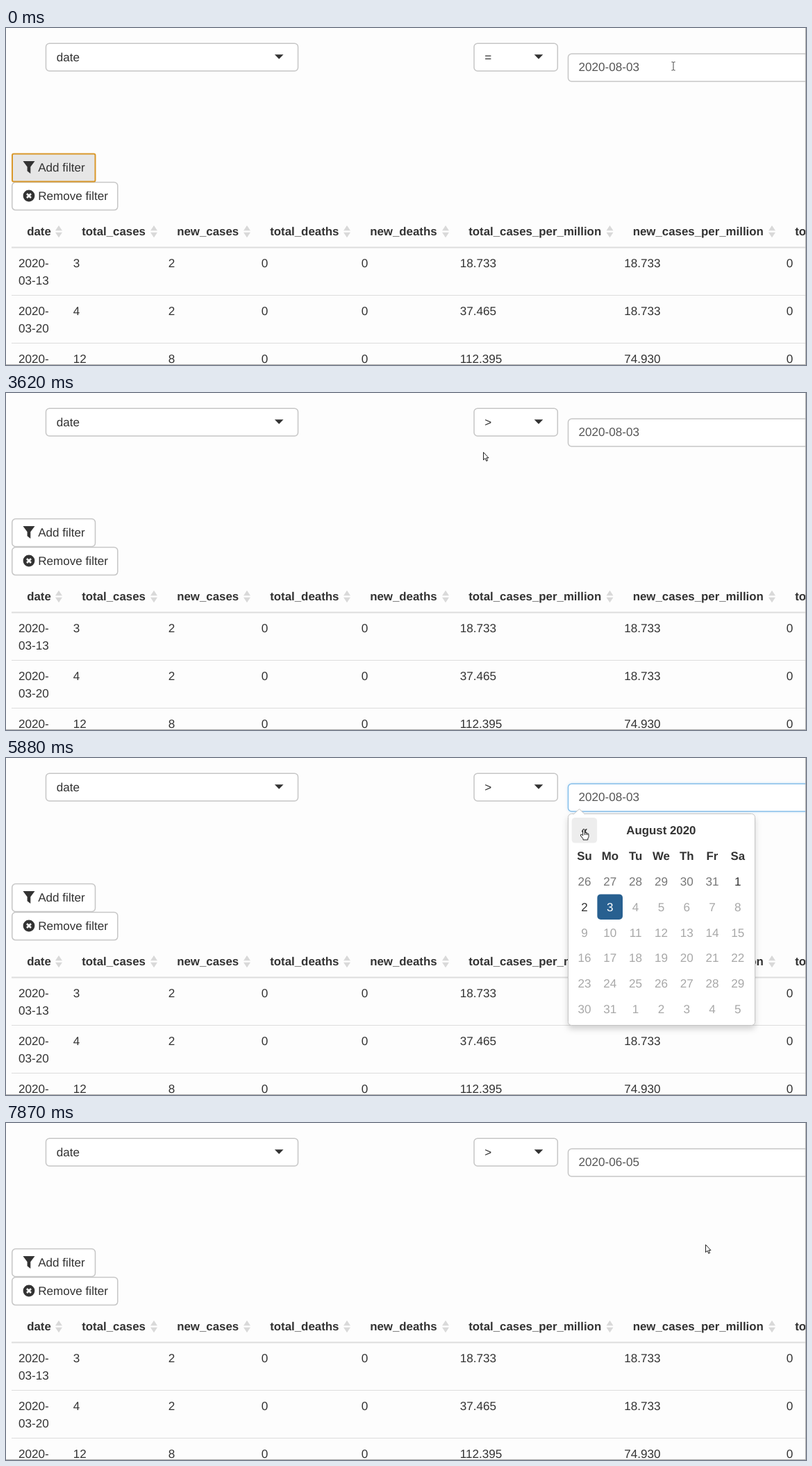
Recreate the animation shown at these times as an HTML page. Size 1152x486 px, loop 7.99 s.

```html
<!DOCTYPE html>
<html lang="en">
<head>
<meta charset="utf-8">
<title>Table filter</title>
<style>
  html, body { margin: 0; width: 100%; height: 100%; overflow: hidden; background: #fdfdfd; }
  svg { display: block; width: 1152px; height: 486px; }
  text { font: 17.1px "Liberation Sans", Arial, sans-serif; fill: #333; text-rendering: geometricPrecision; white-space: pre; }
  .bold { font-weight: 700; font-size: 16.85px; }
  .mid { text-anchor: middle; }
  .value { fill: #555; }
  .other { fill: #777; }
  .off { fill: #a8a8a8; }
  .active { fill: #fff; }
  .box { fill: #fff; stroke: #c6c6c6; stroke-width: 1.5; }
  .focus { stroke: #5aa9e6; filter: drop-shadow(0 0 3px rgba(102, 175, 233, .55)); }
  .fading { stroke: #86bfea; filter: drop-shadow(0 0 2px rgba(102, 175, 233, .3)); }
  .hover { fill: #e6e6e6; stroke: #adadad; }
  .ring { fill: #e6e6e6; stroke: #d9982b; stroke-width: 2; }
  .panel { fill: #fff; stroke: #c4c4c4; filter: drop-shadow(0 5px 4px rgba(0, 0, 0, .17)); }
  .option { fill: #f3f3f3; }
  .tile { fill: #ededed; }
  .picked { fill: #286090; }
  .ink { fill: #333; }
  .sort { fill: #d9d9d9; }
  .rule { fill: #ddd; }
  .edge { fill: #a9a9a9; }
  .pointer { fill: #fff; stroke: #222; stroke-linejoin: round; }
  .beam { fill: none; stroke: #444; }
</style>
</head>
<body>
<svg viewBox="0 0 1152 486"><g id="table"></g><g id="live"></g></svg>
<script>
const LOOP = 7990, TICK = LOOP / 60;
const WHEN = { open: 560, choose: 2380, focus: 5200, calendar: 5330, july: 6000, june: 6520, pick: 7610, close: 7740 };

const START = { x: 961, y: 55 };
const MOVES = [
  { from: 0, to: 700, x: 731, y: 33 },        // operator select
  { from: 900, to: 1990, x: 696, y: 185 },    // ">" option
  { from: 2250, to: 2780, x: 935, y: 68 },    // date input
  { from: 3350, to: 3590, x: 687, y: 85 },
  { from: 3600, to: 4140, x: 92, y: 210 },    // add button
  { from: 4140, to: 5060, x: 989, y: 55 },    // date input
  { from: 5330, to: 5730, x: 832, y: 102 },   // previous month
  { from: 6520, to: 7050, x: 992, y: 200 },
  { from: 7060, to: 7480, x: 1007, y: 175 }   // day to pick
];

const OPTIONS = ["=", "not =", "<", ">", "<=", ">="];
const ROW = 31.6, CELL = 36.8, CAL_X = 814.6, CAL_Y = 86;
const LAST_DAY = Date.UTC(2020, 7, 3);

const escapeText = s => String(s).replace(/&/g, "&amp;").replace(/</g, "&lt;");
const text = (x, y, s, cls = "") => `<text x="${x}" y="${y}" class="${cls}">${escapeText(s)}</text>`;
const rect = (x, y, w, h, cls, r = 0) => `<rect x="${x}" y="${y}" width="${w}" height="${h}" rx="${r}" class="${cls}"/>`;
const path = (d, cls, x = 0, y = 0) => `<path d="${d}" class="${cls}" transform="translate(${x} ${y})"/>`;
const inside = ({ x, y }, left, top, right, bottom) => x >= left && x < right && y >= top && y < bottom;

function table() {
  const names = ["date", "total_cases", "new_cases", "total_deaths", "new_deaths",
    "total_cases_per_million", "new_cases_per_million", "total_deaths_per_million"];
  const edges = [8, 87, 224, 358, 502, 644, 880.5, 1114];
  const rows = [
    ["03-13", 3, 2, 0, 0, "18.733", "18.733", 0],
    ["03-20", 4, 2, 0, 0, "37.465", "18.733", 0],
    ["", 12, 8, 0, 0, "112.395", "74.930", 0]
  ];
  const head = names.map((name, i) => text(edges[i] + 22.2, 299.2, name, "bold") +
    (i ? path("M-5 -1.2L0 -8.7L5 -1.2ZM-5 1.2L0 8.7L5 1.2Z", "sort", edges[i] - 11, 293.5) : "")).join("");
  const body = rows.map(([day, ...cells], i) => {
    const y = 345.2 + i * 68.8;
    return text(18, y, "2020-") + text(18, y + 24.5, day) + rect(8, 385 + i * 69, 1144, 1, "rule") +
      cells.map((cell, c) => text(edges[c + 1] + 9.8, y, cell)).join("");
  }).join("");
  return head + rect(8, 315.5, 1144, 2, "rule") + body;
}

function select(x, w, value, open) {
  const arrow = open ? "M-6.3 3L0 -3.5L6.3 3Z" : "M-6.3 -3L6.3 -3L0 3.5Z";
  return rect(x, 22.3, w, 39.7, "box" + (open ? " focus" : ""), 5) +
    text(x + 15.2, 47.5, value) + path(arrow, "ink", x + w - 27.3, 41.3);
}

function buttons(focused, hovered) {
  const add = focused ? rect(9, 181.5, 119.5, 40, "ring", 2)
    : rect(8.8, 181.5, 119.7, 40, "box" + (hovered ? " hover" : ""), 5);
  return rect(8.8, 222.6, 152, 40, "box", 5) + add +
    path("M24.5 192H41.5L35.3 200.3V210L30.6 206.3V200.3Z", "ink") +
    text(46.2, 207.3, "Add filter") +
    `<circle cx="33" cy="242" r="8.4" class="ink"/>` +
    `<path d="M30 239l6 6m0-6l-6 6" stroke="#fff" stroke-width="2.6"/>` +
    text(46.2, 248.3, "Remove filter");
}

function dropdown(active) {
  return rect(674.2, 66.5, 119.6, 201.5, "panel", 5) +
    rect(675, 72 + active * ROW, 118.5, ROW, "option") +
    OPTIONS.map((option, i) => text(688.7, 92.9 + i * ROW, option)).join("");
}

function calendar(month, hover) {
  const cell = (c, r, s, cls) => text(CAL_X + (c + .5) * CELL, CAL_Y + 24.3 + r * CELL, s, "mid " + cls);
  const tile = (c, r, cls) => rect(CAL_X + c * CELL, CAL_Y + r * CELL, 36.6, 36.6, cls, 5);
  const lead = new Date(Date.UTC(2020, month, 1)).getUTCDay();
  const name = ["June", "July", "August"][month - 5];
  let dates = "";
  for (let i = 0; i < 42; i++) {
    const date = new Date(Date.UTC(2020, month, 1 - lead + i));
    const c = i % 7, r = 2 + Math.floor(i / 7), chosen = +date === LAST_DAY;
    const cls = chosen ? "active" : date > LAST_DAY ? "off" : date.getUTCMonth() !== month ? "other" : "";
    dates += (chosen ? tile(c, r, "picked") : "") + cell(c, r, date.getUTCDate(), cls);
  }
  return rect(809.5, 80.5, 269, 305, "panel", 5) +
    `<path d="M817.5 81l8-7.5l8 7.5" fill="#fff" stroke="#c4c4c4"/>` +
    (hover ? tile(hover.col, hover.row, "tile") : "") +
    cell(0, 0, "«", "bold") + cell(3, 0, name + " 2020", "bold") +
    (month < 7 ? cell(6, 0, "»", "bold") : "") +
    ["Su", "Mo", "Tu", "We", "Th", "Fr", "Sa"].map((d, c) => cell(c, 1, d, "bold")).join("") + dates;
}

const POINTERS = {
  beam: ["M-2.6 -6H-.8L0 -5.2L.8 -6H2.6M0 -5.2V5.2M-2.6 6H-.8L0 5.2L.8 6H2.6", "beam"],
  arrow: ["M.5 .5V11.5L3 9.2L4.8 13.2L6.5 12.4L4.8 8.6H8Z", "pointer"],
  hand: ["M-1.3 1.5Q0 -.3 1.3 1.5V6Q2.7 5 3.6 6.4Q5 5.6 5.6 7Q7 6.6 7 8.5V11.5Q7 13 5.8 14V16H-1V14.5" +
    "L-4.6 10Q-4.8 7.6 -2.8 8.4L-1.3 10ZM1.3 6V9M3.6 6.6V9M5.6 7.2V9", "pointer"]
};

function position(t) {
  return MOVES.reduce((p, { from, to, x, y }) => {
    const u = Math.min(1, Math.max(0, (t - from) / (to - from)));
    const eased = Math.sin(u * Math.PI / 2);
    return { x: p.x + (x - p.x) * eased, y: p.y + (y - p.y) * eased };
  }, START);
}

function scene(t) {
  const at = position(t);
  const during = (from, to) => t >= WHEN[from] && t < WHEN[to];
  const open = during("open", "choose"), picking = during("calendar", "close");
  const month = t < WHEN.july ? 7 : t < WHEN.june ? 6 : 5;
  const option = Math.max(0, Math.min(5, Math.floor((at.y - 72) / ROW)));
  const onAdd = inside(at, 8, 181, 129, 222);
  const onPanel = picking && inside(at, 809, 80, 1079, 386);
  const onSelect = inside(at, 674, 22, 795, 63) || open && inside(at, 674, 66, 795, 268);

  const col = Math.floor((at.x - CAL_X) / CELL), row = Math.floor((at.y - CAL_Y) / CELL);
  const clickable = row > 1 ? month < 7 : row === 0 && col % 6 === 0;
  const hover = onPanel && clickable && { col, row };
  const kind = hover || onAdd || onSelect ? "hand"
    : !onPanel && inside(at, 809, 37, 1152, 77) ? "beam" : "arrow";

  const pressing = during("focus", "calendar") || t > WHEN.july - 2.2 * TICK && t < WHEN.july;
  const glow = pressing ? " fading" : during("focus", "close") ? " focus" : "";
  const caret = t > WHEN.june && t < WHEN.pick && Math.floor((t - WHEN.june) / 500) % 2 === 1;

  return buttons(t < WHEN.open, onAdd) +
    select(57.5, 363, "date", false) +
    select(674, 120.3, t < WHEN.choose ? "=" : ">", open) +
    rect(809.5, 37.3, 360, 39.7, "box" + glow, 5) +
    text(824.5, 62.4, t < WHEN.pick ? "2020-08-03" : "2020-06-05", "value") +
    (caret ? rect(911.5, 47, 1, 19, "ink") : "") +
    (open ? dropdown(option) : "") +
    (picking ? calendar(month, hover) : "") +
    rect(1151, 0, 1, 486, "edge") + rect(0, 485, 1152, 1, "edge") +
    path(...POINTERS[kind], Math.round(at.x), Math.round(at.y));
}

const live = document.getElementById("live");
document.getElementById("table").innerHTML = table();
let shown = -1;

function play() {
  const step = Math.floor(performance.now() % LOOP / TICK + .2);
  if (step !== shown) live.innerHTML = scene((shown = step) % 60 * TICK);
  requestAnimationFrame(play);
}
play();
</script>
</body>
</html>
```
